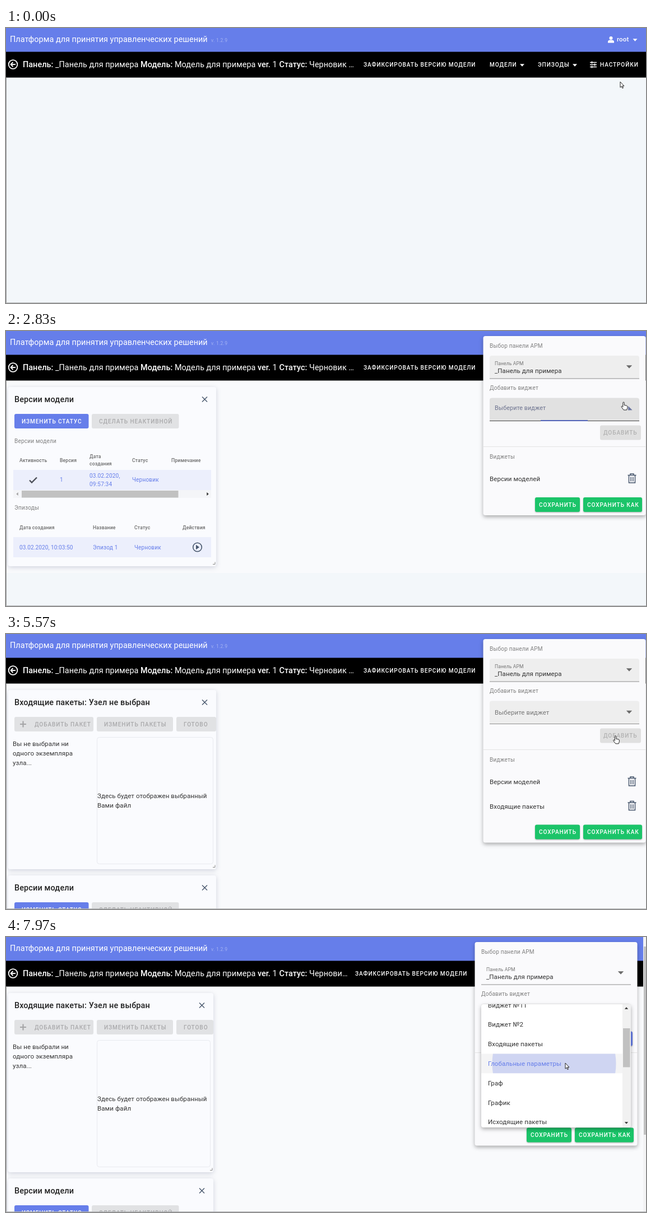
Animation of 1142 by 491 pixels, one loop 8 s. Source, as an HTML page:

```html
<!DOCTYPE html>
<html lang="ru">
<head>
<meta charset="utf-8">
<title>Панель</title>
<style>
html, body { margin: 0; width: 100%; height: 100%; overflow: hidden; background: #f3f7fa; }
svg { display: block; width: 100%; height: 100%; font-family: Roboto, sans-serif; }
text { white-space: pre; }
.card { filter: drop-shadow(0 2px 4px rgba(60, 70, 110, .22)); }
.menu { filter: drop-shadow(0 3px 3.5px rgba(0, 0, 0, .32)); }
.raised { filter: drop-shadow(0 1px 1px rgba(0, 0, 0, .3)); }
</style>
</head>
<body>
<svg id="stage" viewBox="0 0 1142 491"></svg>
<script>
const BLUE = '#667eea', GREEN = '#1bc469', SLATE = '#46556b', GRAY = '#808080';
const LOOP = 8000, ROW = 34.8;

// Bursts of screen updates: first change, last change, number of changes.
const bursts = [[280, 1010, 6], [1310, 2280, 8], [2400, 2520, 2], [2830, 3100, 3], [3530, 4450, 8],
  [4600, 5570, 8], [5690, 6650, 8], [6770, 7700, 8], [7970, 7970, 1]];

// Pointer path: time, x, y, hand shape.
const path = [[0, 1096, 96, 0], [150, 1096, 96, 0], [500, 1095, 58, 1], [1250, 1095, 58, 1],
  [1570, 1094, 188, 1], [1950, 1094, 188, 1], [2280, 1099, 153, 1], [2520, 1102, 127, 1],
  [3400, 1102, 127, 1], [3790, 1065, 198, 1], [4400, 1056, 278, 1], [4700, 1056, 278, 0],
  [4870, 1087, 217, 0], [5000, 1087, 217, 0], [5180, 1088, 184, 1], [5520, 1088, 184, 1],
  [5820, 1082, 155, 1], [6000, 1084, 137, 1], [6400, 1084, 137, 1], [6650, 1080, 150, 1],
  [7450, 998, 225, 1], [7900, 998, 225, 0], [LOOP, 998, 225, 0]];

const options = ['Версии моделей', 'Версии узла', 'Виджет №11', 'Виджет №2', 'Входящие пакеты',
  'Глобальные параметры', 'Граф', 'График', 'Исходящие пакеты'];

const ramp = (t, a, b) => Math.min(1, Math.max(0, (t - a) / (b - a)));
const smooth = p => p * p * (3 - 2 * p);

const text = (x, y, s, size = 11.52, fill = '#333', spacing = .08, weight = 400) =>
  `<text x="${x}" y="${y}" font-size="${size}" fill="${fill}" letter-spacing="${spacing}" font-weight="${weight}">${s}</text>`;
const caps = (x, y, s, fill = '#fff') => text(x, y, s, 10.08, fill, .9, 500);
const small = (x, y, s, fill = GRAY) => text(x, y, s, 10.08, fill, .18);
const heading = (x, y, s) => text(x, y, s, 8.64, '#6a6a6a', .15, 500);
const title = (x, y, s) => text(x, y, s, 14.4, '#222', .14, 500);
const banner = (x, y, s, weight) => text(x, y, s, 14.4, '#fff', .045, weight);
const rect = (x, y, w, h, fill, r = 0, extra = '') =>
  `<rect x="${x}" y="${y}" width="${w}" height="${h}" rx="${r}" fill="${fill}" ${extra}/>`;
const line = (d, stroke, width = 1.5) => `<path d="${d}" fill="none" stroke="${stroke}" stroke-width="${width}"/>`;
const caret = (x, y, fill, w = 4, h = 4.5, angle = 0) =>
  `<path d="M${-w} ${-h / 2}H${w}L0 ${h / 2}Z" fill="${fill}" transform="translate(${x} ${y}) rotate(${angle})"/>`;
const group = (content, transform, extra = '') => `<g transform="${transform}" ${extra}>${content}</g>`;

const button = (x, y, w, label, textX, fill) =>
  rect(x, y, w, 26, fill, 3, 'class="raised"') + caps(textX, y + 16.5, label);
const flatButton = (x, y, w, label, textX) =>
  rect(x, y, w, 26, '#e1e2e4', 3) + caps(textX, y + 17, label, '#a9a9ab');

function held(t) {
  let last = 0;
  for (const [from, to, count] of bursts)
    for (let i = 0; i < count; i++) {
      const tick = from + (to - from) * i / Math.max(1, count - 1);
      if (tick - (i ? 10 : 0) <= t) last = tick;
    }
  return last;
}

function pointerAt(t) {
  const i = path.findIndex((key, n) => n && t <= key[0]);
  const a = path[i - 1], b = path[i], p = smooth(ramp(t, a[0], b[0]));
  return { x: a[1] + (b[1] - a[1]) * p, y: a[2] + (b[2] - a[2]) * p, hand: p < .5 ? a[3] : b[3] };
}

function pointer({ x, y, hand }) {
  const d = hand
    ? 'M-1.2 1.2q0-1.2 1.2-1.2t1.2 1.2v4.2l4.2.8q1.4.4 1.4 1.9v2.2l-1.2 3.7h-5.4l-3.9-5.2q-.6-1 .3-1.5.8-.4 1.6.5l.6.7z'
    : 'M0 0V10.2L2.3 8.1 3.9 11.6 5.5 10.9 3.9 7.5H6.9Z';
  return group(`<path d="${d}" fill="#fff" stroke="#222" stroke-width="1" stroke-linejoin="round"/>`, `translate(${x} ${y})`);
}

function header(shift) {
  const right = shift ? 1137 : 1142;
  const parts = [[30, 'Панель:', 500], [88, '_Панель для примера'], [240, 'Модель:', 500], [301, 'Модель для примера'],
    [449, 'ver.', 500], [475.5, '1'], [487.5, 'Статус:', 500], [541, shift ? 'Чернови…' : 'Черновик …']];
  const menu = caps(638, 69, 'ЗАФИКСИРОВАТЬ ВЕРСИЮ МОДЕЛИ') + caps(863, 69, 'МОДЕЛИ') + caret(921, 66.5, '#fff') +
    caps(949, 69, 'ЭПИЗОДЫ') + caret(1015, 66.5, '#fff') + caps(1060, 69, 'НАСТРОЙКИ') +
    line('M1042 61.5H1054M1042 65.5H1054M1042 69.5H1054M1045.5 59.5V63.5M1050.5 63.5V67.5M1045.5 67.5V71.5', '#fff') +
    '<circle cx="1079.5" cy="18" r="3" fill="#fff"/><path d="M1074 26.5V25q0-3.5 3.5-3.5h4q3.5 0 3.5 3.5v1.5z" fill="#fff"/>' +
    text(1090, 24, 'root', 11.52, '#fff', .2, 500) + caret(1122.5, 21.5, '#fff');
  return rect(0, 0, right, 43, BLUE) + rect(0, 42.5, right, 46, '#000') +
    banner(7, 25, 'Платформа для принятия управленческих решений') +
    text(366, 25, 'v. 1.2.9', 8.64, '#a4b2f3', .25) +
    '<circle cx="12.5" cy="65" r="7.8" fill="none" stroke="#fff" stroke-width="1.8"/>' +
    line('M17 65H9M12.5 61L8.5 65 12.5 69', '#fff', 1.8) +
    parts.map(([x, s, weight]) => banner(x, 70, s, weight || 400)).join('') +
    group(menu, `translate(${-shift} 0)`);
}

const card = (width, name) => rect(3.5, 100, width - 3.5, 320, '#fafbfe', 4, 'class="card"') + title(15, 127, name) +
  line(`M${width - 25} 117.5l9 9m0-9l-9 9`, SLATE, 1.4) + line(`M${width - 2} 412.5v4h-4`, '#888', 1);

function versionsCard(width) {
  const tableRow = y => rect(13, y, width - 22, 36, '#eceffc');
  return card(width, 'Версии модели') +
    rect(15, 148, 132.5, 26, BLUE, 3) + caps(28, 165, 'ИЗМЕНИТЬ СТАТУС') +
    flatButton(153, 148, 155.5, 'СДЕЛАТЬ НЕАКТИВНОЙ', 166) +
    small(15, 200, 'Версии модели') +
    heading(24, 234, 'Активность') + heading(96, 234, 'Версия') + heading(149, 227, 'Дата') +
    heading(149, 240, 'создания') + heading(225, 234, 'Статус') + heading(295, 234, 'Примечание') +
    tableRow(248) + line('M42 266.5l4 4 9-9', '#4c4f58', 2.4) + small(96, 269, '1', BLUE) +
    small(149, 262, '03.02.2020,', BLUE) + small(149, 277, '09:57:34', BLUE) + small(225, 269, 'Черновик', BLUE) +
    rect(13, 284, width - 22, 14, '#f4f5f8') + rect(28, 285, 279.5, 12.5, '#c1c1c1') +
    caret(20, 291, '#a3a3a3', 3, 3.5, 90) + caret(360, 291, '#333', 3, 3.5, -90) +
    small(15, 319, 'Эпизоды') +
    heading(24, 354, 'Дата создания') + heading(155, 354, 'Название') + heading(229, 354, 'Статус') + heading(315, 354, 'Действия') +
    tableRow(368) + text(24, 390, '03.02.2020, 10:03:50', 10.08, BLUE) + small(155, 390, 'Эпизод 1', BLUE) +
    small(229, 390, 'Черновик', BLUE) +
    `<circle cx="341.5" cy="386" r="7.8" fill="none" stroke="${SLATE}" stroke-width="1.6"/>` + caret(342, 386, SLATE, 4.2, 6, -90);
}

function packetsCard(width) {
  return card(width, 'Входящие пакеты: Узел не выбран') +
    flatButton(15, 148, 141, 'ДОБАВИТЬ ПАКЕТ', 51) + line('M25 161H36M30.5 155.5V166.5', '#a5a5a7', 2.2) +
    flatButton(162, 148, 136, 'ИЗМЕНИТЬ ПАКЕТЫ', 175) + flatButton(304, 148, width - 304, 'ГОТОВО', 317) +
    ['Вы не выбрали ни', 'одного экземпляра', 'узла...'].map((s, i) => text(12, 200 + 17 * i, s)).join('') +
    rect(162.5, 184.5, width - 168, 226, 'none', 4, 'stroke="#e8eaef"') +
    text(163, 293, 'Здесь будет отображен выбранный') + text(163, 310, 'Вами файл');
}

const field = (y, fill, rule = '#8e8e8e') =>
  `<path d="M863 ${y + 41}V${y + 4}q0-4 4-4H1126q4 0 4 4V${y + 41}Z" fill="${fill}"/>` + rect(863, y + 40.5, 267, 1, rule);

function widgetSelect({ value, focused, focusing, hover }) {
  const tone = focused ? BLUE : '#6b6b6b';
  let out = field(119.5, hover || focusing ? '#e1e1e1' : '#eee', focusing ? '#444' : undefined);
  if (focused) out += rect(863, 159, 267, 2, BLUE);
  if (focusing) out += rect(954, 159, 84, 2, '#5264b8');
  out += caret(1112, 139.5, focusing ? '#6b759f' : tone, 5.2, 5.4, focusing ? 45 : 0);
  if (value) return out + text(872, 136, 'Выберите виджет', 8.64, focused ? BLUE : '#777') + text(872, 151, value);
  return out + (focusing ? text(872, 141, 'Выберите виджет', 10.78, '#6d738f') : text(872, 144, 'Выберите виджет', 11.52, '#777'));
}

function widgetItem(name, i) {
  return group(text(863, 268, name) +
    line('M1109.5 257.5H1124.5M1114 257V255H1120V257M1111.5 258V271H1122.5V258M1115.2 260.5V268.5M1118.8 260.5V268.5', SLATE),
    `translate(0 ${43.5 * i})`);
}

function settings(state) {
  const bottom = 285.5 + 43.5 * state.widgets.length;
  return rect(851.5, 9, 290, bottom - 9, state.widgets.length ? '#fafafc' : '#fefefe', 4, 'class="menu"') +
    small(863, 30, 'Выбор панели АРМ') + field(44, state.shift ? 'none' : '#eee') +
    text(872, 61, 'Панель АРМ', 8.64, '#777') + text(872, 75, '_Панель для примера') + caret(1112, 64, '#6b6b6b', 5.2, 5.4) +
    small(863, 105, 'Добавить виджет') + widgetSelect(state) +
    (state.canAdd ? button(1060, 168.5, 73, 'ДОБАВИТЬ', 1066, state.pressed ? '#8799ee' : BLUE)
      : rect(1060, 168.5, 73, 26, '#e0e0e0', 3) + caps(1066, 185, 'ДОБАВИТЬ', '#b2b2b2')) +
    rect(851.5, 206, 290, 1, '#e3e3e3') + small(863, 228, 'Виджеты') + state.widgets.map(widgetItem).join('') +
    button(944, bottom - 32, 80, 'СОХРАНИТЬ', 951, GREEN) + button(1030, bottom - 32, 105, 'СОХРАНИТЬ КАК', 1037, GREEN);
}

function optionList({ opening, scroll, hoverRow, chosen }) {
  const rows = options.map((name, i) => {
    const top = 125 + ROW * i - scroll, picked = chosen && i === hoverRow;
    return (i === hoverRow ? rect(863, top, 252, ROW, '#f4f4f5') : '') +
      (picked ? `<clipPath id="row">${rect(863, top, 252, ROW, '#000')}</clipPath>` +
        `<circle cx="993" cy="${top + ROW / 2}" r="110.5" fill="#cfd5f2" clip-path="url(#row)"/>` : '') +
      text(875, top + 21.5, name, 11.52, picked ? BLUE : '#333');
  }).join('');
  const content = rect(863, 120, 267, 220, '#fff', 4, 'class="menu"') +
    `<clipPath id="list">${rect(863, 120, 267, 220, '#000', 4)}</clipPath><g clip-path="url(#list)">${rows}` +
    rect(1115, 120, 15, 220, '#f1f1f1') + rect(1116, 134 + scroll * .32, 12.5, 69.5, '#c1c1c1') + '</g>' +
    caret(1122, 127, scroll ? '#333' : '#a3a3a3', 3.2, 3.5, 180) + caret(1122, 332, '#333', 3.2, 3.5);
  const scale = .8 + .2 * opening;
  return group(content, `translate(996 120) scale(${scale}) translate(-996 -120)`, `opacity="${opening}"`);
}

function scene(t) {
  const between = (a, b) => t >= a && t < b;
  const shift = t >= 5680 ? 15 : 0, width = shift ? 370 : 375;
  const one = t >= 1855, two = t >= 5560;
  const cursor = pointerAt(t);
  const value = !one ? options[0] : between(4730, 5560) ? options[4] : '';
  const chosen = between(4600, 4730) || t >= 7960;
  const scroll = 90.5 * smooth(ramp(t, 6950, 7250));
  const state = {
    shift, value, chosen, scroll,
    focused: between(4730, 5280),
    focusing: between(2830, 4730) || t >= 6240,
    hover: Math.abs(cursor.y - 140) < 21 && cursor.x > 863 - shift && cursor.x < 1130 - shift,
    canAdd: !!value || chosen,
    pressed: between(1720, 1855) || between(5420, 5560),
    widgets: [one && options[0], two && options[4]].filter(Boolean),
    hoverRow: Math.floor((cursor.y - 135 + scroll) / ROW),
    opening: t < 4730 ? ramp(t, 2900, 3000) : ramp(t, 6320, 6420)
  };
  const opened = ramp(t, 660, 760);
  let out = rect(0, 0, 1142, 491, '#f3f7fa');
  if (one) out += rect(0, 88, 1142, two ? 403 : 344, '#f9fafc');
  if (two) out += packetsCard(width);
  if (one) out += group(versionsCard(width), `translate(0 ${two ? 331 : 0})`);
  out += rect(0, 89, 1, 402, '#999') + rect(0, 490, 1142, 1, '#b4b6b8') + header(shift);
  if (shift) out += rect(1137, 0, 5, 490, '#f3f3f4') + rect(1138, 17, 4, 336, '#c1c1c1');
  if (opened) {
    const scale = .8 + .2 * opened;
    out += group(settings(state),
      `translate(${1142 - shift} 9) scale(${scale}) translate(-1142 -9)`, `opacity="${opened}"`);
  }
  const listShown = between(2900, 4730) || t >= 6320;
  if (listShown) out += group(optionList(state), `translate(${-shift} 0)`);
  return out + pointer(cursor);
}

const stage = document.getElementById('stage');
let shown = -1;
function draw() {
  const t = held(performance.now() % LOOP);
  if (t !== shown) stage.innerHTML = scene(shown = t);
  requestAnimationFrame(draw);
}
draw();
</script>
</body>
</html>
```
